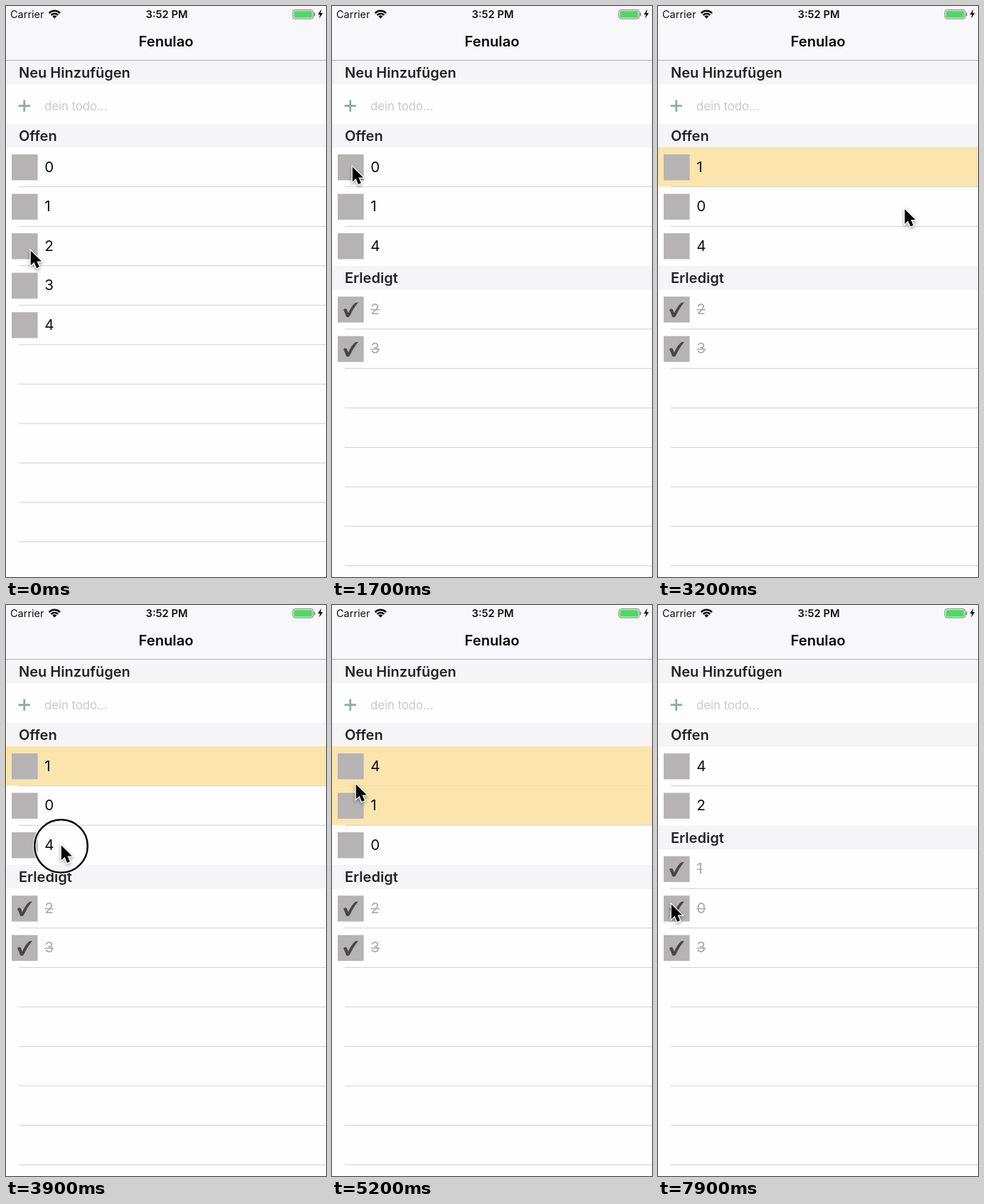
Write an HTML page with a canvas that moves like this. It is 450 px wide and 804 px high and loops after 8000 ms.

```html
<!DOCTYPE html>
<html lang="de">
<head>
<meta charset="utf-8">
<title>Todo</title>
<style>
html, body { margin: 0; width: 100%; height: 100%; overflow: hidden; background: #fefdff; }
canvas { display: block; width: 450px; height: 804px; }
</style>
</head>
<body>
<canvas></canvas>
<script>
const W = 450, H = 804, LOOP = 8000, STEP = 100;
const ROW = 55.55, HEAD = 33.6, TOP = 76.6;
const TAP = 200, DRAG = 500, SETTLE = 300, REST = 200, TRAVEL = 306;
const canvas = document.querySelector('canvas'), ctx = canvas.getContext('2d');
const dpr = window.devicePixelRatio || 1;
canvas.width = W * dpr;
canvas.height = H * dpr;

// A gesture ends at its time: a tap toggles its item, a drag makes it a favorite.
const tap = (up, item, x, y) => ({ item, x, y, endX: x, down: up - TAP, up, leave: up + REST, done: up });
const drag = (up, item, x, y) =>
  ({ item, x, y, endX: x + TRAVEL, down: up - DRAG, up, leave: up + REST, done: up + SETTLE, swipe: true });
const pass = (t, x, y) => ({ x, y, endX: x, down: t, up: t, leave: t });
const gestures = [
  tap(400, '2', 34, 343), tap(1100, '3', 34, 343), pass(1700, 28, 225),
  drag(2800, '1', 79, 277), drag(4400, '4', 77, 337), pass(5200, 33, 251),
  tap(5600, '4', 23, 225), tap(6000, '1', 23, 225), tap(6400, '0', 23, 225),
  tap(6800, '4', 23, 225), tap(7700, '2', 18, 420)
];

const checkMark = new Path2D('M16 28.3C17.6 26.2 20.2 26 21.2 28.6L22.8 32.6C25.6 26.6 29 21.4 32 18.8' +
  'C33.5 17.9 35.5 17.6 36.8 18C31.8 24 28 30.5 25 37C23.6 39 20.8 39.2 19.8 37.3C18.8 34 17.6 31 16 28.3Z');
const arrow = new Path2D('M0 0V24L5.5 19L9.5 28.5L14 26.5L10 17.5H17.5Z');
const bolt = new Path2D('M443.5 4.5L438.5 12H441.6L440.3 17.5L445.5 10H442.3Z');

const mix = (a, b, p) => a + (b - a) * p;

function ease(from, to, t) {
  const p = Math.min(1, Math.max(0, (t - from) / (to - from || 1)));
  return p * p * (3 - 2 * p);
}

function pointerAt(t) {
  const i = gestures.findLastIndex(g => t >= g.down);
  const last = gestures[Math.max(i, 0)], next = gestures[i + 1] || last;
  if (t < last.leave) return [mix(last.x, last.endX, ease(last.down, last.up, t)), last.y];
  const p = ease(last.leave, next.down, t);
  return [mix(last.endX, next.x, p), mix(last.y, next.y, p)];
}

function offset(item, t) {
  const g = gestures.find(g => g.swipe && g.item === item && t >= g.down && t < g.done);
  if (!g) return 0;
  if (t < g.up) return TRAVEL * ease(g.down, g.up, t);
  return TRAVEL * (1 - ((t - g.up) / SETTLE) ** 1.5);
}

function stateAt(t) {
  let order = [...'01234'];
  const done = new Set(), favorites = new Set();
  for (const { item, swipe } of gestures.filter(g => g.done <= t)) {
    if (swipe) {
      order = [item, ...order.filter(other => other !== item)];
      favorites.add(item);
    } else {
      favorites.delete(item);
      if (!done.delete(item)) done.add(item);
    }
  }
  return { order, done, favorites };
}

function box(x, y, w, h, color) {
  ctx.fillStyle = color;
  ctx.fillRect(x, y, w, h);
}

function text(str, x, y, size, color, weight = 400, align = 'left') {
  ctx.font = `${weight} ${size}px Inter, "Liberation Sans", sans-serif`;
  ctx.textAlign = align;
  ctx.fillStyle = color;
  ctx.fillText(str, x, y);
}

function separator(y, x = 18) {
  box(x, y - 0.8, W - x, 1, '#d0cfd3');
}

function header(title, y) {
  box(0, y, W, HEAD, '#f5f4f7');
  text(title, 18, y + 24.2, 20, '#232326', 600);
}

function row(item, y, done, favorite, dx) {
  if (favorite) box(0, y - 0.6, W, ROW, '#fbe5ac');
  if (dx > 0) {
    ctx.save();
    ctx.beginPath();
    ctx.rect(0, y - 0.7, dx - 0.7, ROW);
    ctx.clip();
    box(0, y - 1, W, ROW + 1, '#fcd364');
    text('Favorite', dx - 27, y + 34.4, 17.3, '#fff', 400, 'right');
    ctx.restore();
  }
  ctx.save();
  ctx.translate(dx, y);
  box(8, 9.6, 36.6, 36.4, '#b5b3b4');
  text(item, 54.3, 34.2, 20.6, done ? '#aaa9ad' : '#0c0c0d');
  if (done) {
    box(54.3, 27.4, ctx.measureText(item).width, 1.4, '#aaa9ad');
    ctx.fillStyle = '#484748';
    ctx.fill(checkMark);
  }
  ctx.restore();
}

function list(t) {
  const { order, done, favorites } = stateAt(t);
  let y = TOP + HEAD + ROW;
  for (const [title, closed] of [['Offen', false], ['Erledigt', true]]) {
    const items = order.filter(item => done.has(item) === closed);
    if (!items.length) continue;
    header(title, y);
    y += HEAD;
    items.forEach((item, i) => {
      const dx = offset(item, t);
      row(item, y, closed, favorites.has(item), dx);
      y += ROW;
      if (i < items.length - 1) separator(y, 18 + dx);
    });
  }
  for (; y < H; y += ROW) separator(y);
}

function bars() {
  box(0, 0, W, 76, '#f8f7f9');
  box(0, 76, W, 1, '#b1b0b3');
  text('Carrier', 6, 16.5, 14.5, '#111');
  text('3:52 PM', 226, 16.5, 14.7, '#111', 600, 'center');
  text('Fenulao', 225, 57, 20.2, '#080808', 600, 'center');

  // signal
  const wave = r => {
    ctx.beginPath();
    ctx.arc(68.3, 17.4, r, -Math.PI * 0.76, -Math.PI * 0.24);
  };
  ctx.strokeStyle = ctx.fillStyle = '#080808';
  ctx.lineWidth = 2.5;
  for (const r of [6.7, 10.6]) {
    wave(r);
    ctx.stroke();
  }
  wave(4.2);
  ctx.lineTo(68.3, 17.8);
  ctx.fill();

  // battery
  ctx.lineWidth = 1;
  ctx.strokeStyle = '#777';
  ctx.beginPath();
  ctx.roundRect(403.5, 5.5, 28.5, 12.5, 3);
  ctx.stroke();
  ctx.fillStyle = '#4cd964';
  ctx.beginPath();
  ctx.roundRect(405, 7, 25.5, 9.5, 1.5);
  ctx.fill();
  box(433, 9.5, 1.5, 4.5, '#777');
  ctx.fillStyle = '#080808';
  ctx.fill(bolt);
}

function mouse(t) {
  const [x, y] = pointerAt(t);
  if (gestures.some(g => t >= g.down && t < g.up)) {
    ctx.beginPath();
    ctx.arc(x + 0.5, y + 2.5, 37.3, 0, Math.PI * 2);
    for (const [width, color] of [[4.5, '#fff'], [2.5, '#080808']]) {
      ctx.lineWidth = width;
      ctx.strokeStyle = color;
      ctx.stroke();
    }
  }
  ctx.save();
  ctx.translate(x + 0.8, y + 1.5);
  ctx.scale(0.86, 0.86);
  ctx.lineWidth = 3;
  ctx.strokeStyle = '#fff';
  ctx.shadowColor = 'rgba(0,0,0,.4)';
  ctx.shadowBlur = 4 * dpr;
  ctx.shadowOffsetY = 2 * dpr;
  ctx.stroke(arrow);
  ctx.shadowColor = 'transparent';
  ctx.fillStyle = '#000';
  ctx.fill(arrow);
  ctx.restore();
}

function draw(t) {
  ctx.setTransform(dpr, 0, 0, dpr, 0, 0);
  box(0, 0, W, H, '#fefdff');
  header('Neu Hinzufügen', TOP);
  bars();
  box(17.5, 139.2, 16.4, 2.8, '#8bb19b');
  box(24.3, 132.4, 2.8, 16.4, '#8bb19b');
  text('dein todo...', 54, 147.3, 16.7, '#cac9ce');
  list(t);
  mouse(t);
}

const start = performance.now();
function frame() {
  const t = (performance.now() - start) % LOOP;
  draw(Math.floor(t / STEP) * STEP);
  requestAnimationFrame(frame);
}
frame();
</script>
</body>
</html>
```
